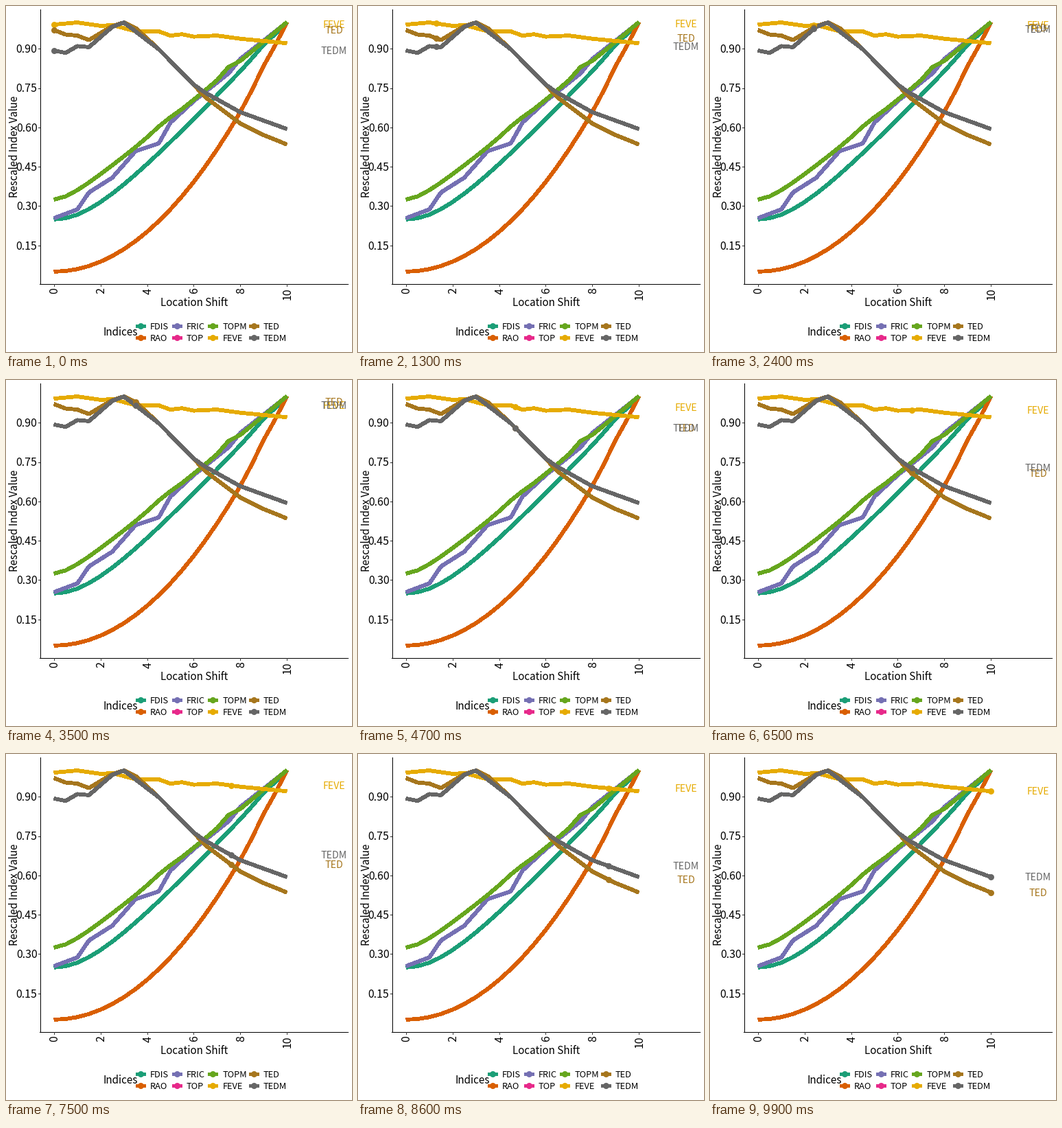
A matplotlib script for the animation above (10 s loop, 504 by 504 pixels).

```python
import numpy as np
import matplotlib.pyplot as plt
from matplotlib.animation import FuncAnimation

SIZE, DPI = 504, 72          # at 72 dpi one point is one pixel
FRAMES, INTERVAL = 100, 100
LABEL_X = 477.5
TITLE, TICK, KEY, LABEL = 15.2, 16, 12.8, 14.2   # font sizes

plt.rcParams["font.family"] = "Noto Sans CJK JP"

COLORS = {
    "FDIS": "#1b9e77", "RAO": "#d95f02", "FRIC": "#7570b3", "TOP": "#e7298a",
    "TOPM": "#66a61e", "FEVE": "#e6ab02", "TED": "#a6761d", "TEDM": "#666666",
}
MOVING = ["FEVE", "TED", "TEDM"]

xs = np.arange(0, 10.5, 0.5)


def to_px(x):
    return 70 + 33.9 * x


def to_py(v):
    return 24 + 382 * (1 - v)


def bump(at, height, width):
    return height * np.exp(-((xs - at) / width) ** 2)


def through(*points):
    """Straight segments through a few (x, value) points."""
    return np.interp(xs, *zip(*points))


def build_curves():
    t = xs / 10
    spread = t ** 2 + bump(9, 0.015, 0.5)
    slope = (4.5, 0.898), (6, 0.763)     # shared by both TED curves
    return {
        "FDIS": np.sqrt(0.062 + 0.938 * spread),
        "RAO": 0.05 + 0.95 * spread,
        "FRIC": through((0, 0.254), (1, 0.287), (1.5, 0.352), (2.5, 0.408),
                        (3.5, 0.509), (4.5, 0.539), (5, 0.618), (6, 0.7),
                        (7.5, 0.806), (8, 0.861), (10, 1)),
        "TOPM": (0.325 + 0.75 * t ** 2 / (t + 0.11)
                 + bump(7.5, 0.015, 0.3) + bump(4.7, 0.008, 0.6)),
        "FEVE": through((0, 0.992), (1, 1), (2, 0.987), (2.5, 0.99),
                        (3.5, 0.967), (4.5, 0.966), (5, 0.95), (5.5, 0.955),
                        (6, 0.946), (7, 0.95), (8, 0.938), (10, 0.921)),
        "TED": through((0, 0.971), (0.5, 0.954), (1, 0.95), (1.5, 0.933),
                       (2.5, 0.986), (3, 1), (3.5, 0.979), *slope,
                       (6.5, 0.715), (8, 0.615), (9, 0.571), (10, 0.535)),
        "TEDM": through((0, 0.893), (0.5, 0.884), (1, 0.91), (1.5, 0.906),
                        (2.5, 0.983), (3, 1), (3.5, 0.966), *slope,
                        (6.5, 0.732), (8, 0.658), (10, 0.594)),
    }


fig = plt.figure(figsize=(SIZE / DPI, SIZE / DPI), dpi=DPI, facecolor="white")
ax = fig.add_axes([0, 0, 1, 1])
ax.set_xlim(0, SIZE)
ax.set_ylim(SIZE, 0)
ax.axis("off")


def line(x, y, color="black", width=1.0):
    ax.plot(x, y, color=color, lw=width, solid_capstyle="butt",
            solid_joinstyle="round", antialiased=False)


def dot(x, y, color, **kw):
    return ax.plot([x], [y], "o", ms=9, mew=0, color=color,
                   antialiased=False, **kw)[0]


def text(x, y, s, size, color="black", ha="left", **kw):
    return ax.text(x, y, s, fontsize=size, color=color, ha=ha, va="baseline",
                   rotation_mode="anchor", **kw)


def draw_axes():
    line([49.5, 49.5], [5, 405])
    line([49, 498], [404.5, 404.5])
    for v in np.arange(0.15, 0.95, 0.15):
        y = to_py(v)
        line([47, 49], [y, y], "#333333")
        text(45.5, y + 5.9, f"{v:.2f}", TICK, ha="right")
    for v in range(0, 11, 2):
        x = to_px(v)
        line([x, x], [405, 408], "#333333")
        text(x + 5.6, 410.5, str(v), TICK, ha="right", rotation=90)
    text(274, 437.2, "Location Shift", TITLE, ha="center")
    text(17.2, 205, "Rescaled Index Value", TITLE, ha="center", rotation=90)


def draw_legend():
    text(141.5, 480, "Indices", TITLE)
    key_xs = [196, 248.7, 301.3, 361]
    for i, (name, color) in enumerate(COLORS.items()):
        x, y = key_xs[i // 2], 466 + 17.3 * (i % 2)
        line([x - 7, x + 7], [y, y], color, 4.6)
        dot(x, y, color)
        text(x + 14, y + 5, name, KEY)


curves = build_curves()
draw_axes()
draw_legend()
for name, values in curves.items():
    line(to_px(xs), to_py(values), COLORS[name], 4.8)

dots = {n: dot(0, 0, COLORS[n], zorder=4) for n in MOVING}
labels = {n: text(LABEL_X, 0, n, LABEL, COLORS[n], ha="center", zorder=5)
          for n in MOVING}

# Each data point falls on a whole frame; motion is linear in between
key_frames = np.round(xs * (FRAMES - 1) / 10)


def update(i):
    x = np.interp(i, key_frames, xs)
    for n in MOVING:
        y = to_py(np.interp(x, xs, curves[n]))
        dots[n].set_data([to_px(x)], [y])
        labels[n].set_y(y + 5.2)
    return [*dots.values(), *labels.values()]


anim = FuncAnimation(fig, update, frames=FRAMES, interval=INTERVAL,
                     repeat=True, repeat_delay=0)
plt.show()
```
